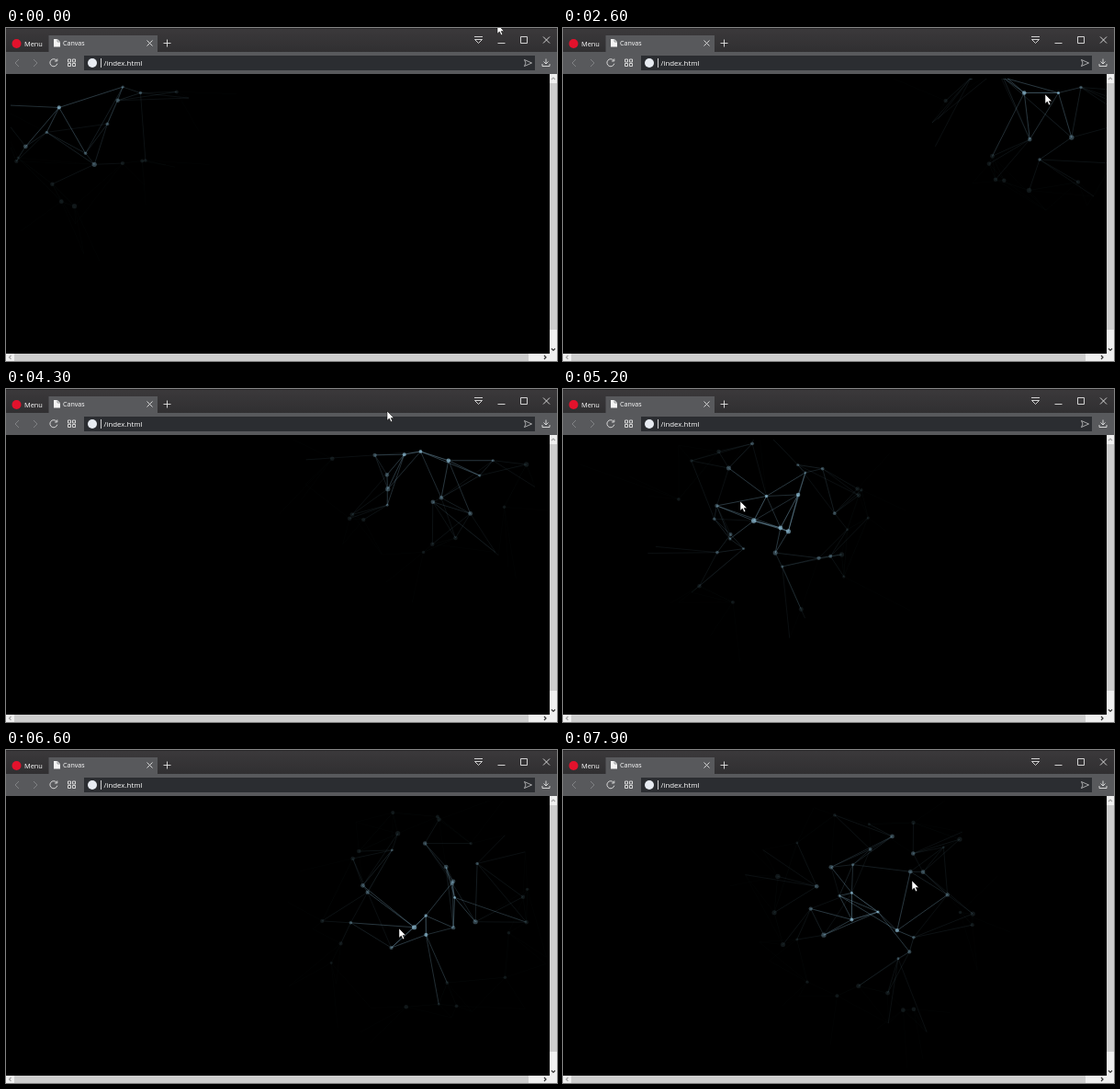
An HTML page with a canvas that plays this animation: 600x362 px, repeating every 8000 ms.

```html
<!DOCTYPE html>
<html lang="en">
<head>
<meta charset="utf-8">
<title>Canvas</title>
<style>
  html, body { margin: 0; width: 100%; height: 100%; overflow: hidden; background: #000; }
  svg, canvas { position: absolute; left: 0; top: 0; display: block; }
  canvas { left: 5px; top: 55px; }
  text { font: 7.4px "Open Sans", "Noto Sans", sans-serif; fill: #fff; }
  .line { fill: none; stroke: #e4e4e4; stroke-width: .9; }
  .dim { stroke: #85878a; }
  .arrow { stroke-width: 1.2; }
</style>
</head>
<body>
<canvas id="net" width="587" height="299"></canvas>
<svg width="600" height="362" viewBox="0 0 600 362">
  <defs>
    <linearGradient id="bar" x2="0" y2="1">
      <stop offset="0" stop-color="#3b393b"/><stop offset="1" stop-color="#302f31"/>
    </linearGradient>
  </defs>
  <!-- title bar, tab, toolbar -->
  <rect width="600" height="27" fill="url(#bar)"/>
  <rect width="600" height="1" fill="#29282a"/>
  <rect y="26" width="600" height="24" fill="#58595c"/>
  <rect x="46.500" y="8" width="118.500" height="19" fill="#58595c"/>
  <rect x="85" y="30" width="491" height="16" fill="#2b2d31"/>
  <circle cx="11.5" cy="17" r="5" fill="#e3122c"/>
  <circle cx="94" cy="38" r="5" fill="#e8ecf2"/>
  <text x="20" y="20">Menu</text>
  <text x="62" y="19.2" style="font-size:7.1px">Canvas</text>
  <text x="106.5" y="41" style="font-size:7.9px">/index.html</text>
  <path d="M52 12h4l3 3v5.500h-7z" fill="#f4f4f4"/>
  <path d="M56 12v3h3" fill="none" stroke="#77797c" stroke-width=".7"/>
  <path class="line" d="M153.500 13.500l6 6m0-6l-6 6M171.500 16.500h8m-4-4v8M103.500 33v10
    M510 9.500h9M510.500 12.500h8l-4 4zM535.500 16.500h8M560.500 9.500h7v7h-7z
    M585 9.500l7 7m0-7l-7 7M67.500 34h3v3h-3zm5 0h3v3h-3zm-5 4.500h3v3h-3zm5 0h3v3h-3z
    M55 35.200a4 4 0 1 0 .8 3.500M55.800 33.500v2.500h-2.700
    M588 33.500v5.500m-2.500-2.500l2.500 2.500 2.500-2.500M584 39v2.500h8v-2.500"/>
  <path class="line" stroke-opacity=".75" d="M564.500 34.500l8 3.500-8 3.500 1.500-3.500z"/>
  <path class="line dim" d="M14 34l-4 4 4 4M30 34l4 4-4 4"/>
  <!-- scroll bars -->
  <path d="M592 50h8v312H0v-8h592z" fill="#f0f0f0"/>
  <path d="M592 60h8v268h-8zM9 354h560v8H9z" fill="#cdcdcd"/>
  <path class="line arrow" style="stroke:#a6a6a6" d="M594 56l2-2 2 2M5.500 356l-2 2 2 2"/>
  <path class="line arrow" style="stroke:#333" d="M594 348.500l2 2 2-2M586 356l2 2-2 2"/>
  <path id="cursor" d="M0 0v10.200l2.400-2.200 1.700 3.800 1.700-.8-1.600-3.600h3.200z"
    fill="#fff" stroke="#000" stroke-width=".5"/>
</svg>
<script>
const LOOP = 8000, STEP = 100;
const CELL_W = 40, CELL_H = 30, WANDER = 29, LINKS = 5;
const PAGE_ENTRY = 2000, GLOW_LAG = 100, GLOW_TOP = 68;
const FIRST_GLOW = [74, 78];

// Key points of the pointer: time, x, y
const pointer = [
  [0, 535, -4], [1900, 537, -3], [2000, 520, 84], [2600, 525, 72],
  [3800, 500, 30], [4200, 460, 68], [4300, 415, 24], [4700, 430, 100],
  [5100, 228, 132], [5200, 193, 122], [5400, 145, 90], [5700, 430, 6],
  [6500, 455, 172], [6600, 428, 194], [7000, 120, 225], [7500, 150, 235],
  [7800, 345, 173], [7900, 380, 142]];

// Reach of the glow, line opacity, dot opacity
const levels = [[37, .3, .6], [83, .1, .3], [118, .02, .1]];
const tint = a => `rgba(158,212,238,${a})`;

let seed = 11;
function random() {
  seed = (seed * 16807) % 2147483647;
  return seed / 2147483647;
}
const around = (v, r) => v + (random() * 2 - 1) * r;
const linear = u => u;
const circInOut = u => u < .5
  ? (1 - Math.sqrt(1 - 4 * u * u)) / 2
  : (1 + Math.sqrt(1 - 4 * (1 - u) ** 2)) / 2;

function place(stops, t, ease) {
  const i = stops.findIndex(s => s[0] > t);
  if (i < 1) return stops.at(i).slice(1);
  const [t0, x0, y0] = stops[i - 1], [t1, x1, y1] = stops[i];
  const u = ease((t - t0) / (t1 - t0));
  return [x0 + (x1 - x0) * u, y0 + (y1 - y0) * u];
}

// A point drifts between random stops around its home.
function makePoint(x, y) {
  const stops = [];
  for (let t = -2000 * random(); t < LOOP + 2000; t += 1000 + 1000 * random()) {
    stops.push([t, around(x, WANDER), around(y, WANDER)]);
  }
  return { x, y, stops, radius: 1.4 + 1.3 * random() };
}

const points = [];
for (let x = 5; x < 640; x += CELL_W) {
  for (let y = 55; y < 400; y += CELL_H) {
    points.push(makePoint(x + CELL_W * random(), y + CELL_H * random()));
  }
}
const distance = (a, b) => Math.hypot(a.x - b.x, a.y - b.y);
for (const p of points) {
  p.near = points.filter(q => q !== p)
    .sort((a, b) => distance(a, p) - distance(b, p)).slice(0, LINKS);
}

// The glow trails the pointer and stays inside the page.
function glowAt(t) {
  if (t < PAGE_ENTRY + GLOW_LAG) return FIRST_GLOW;
  const [x, y] = place(pointer, t - GLOW_LAG, linear);
  return [x, Math.max(y, GLOW_TOP)];
}

const ctx = document.getElementById('net').getContext('2d');
const cursor = document.getElementById('cursor');
ctx.translate(-5, -55);
ctx.lineWidth = .7;

function draw(t) {
  ctx.clearRect(0, 0, 600, 362);
  const [gx, gy] = glowAt(t);
  for (const p of points) p.pos = place(p.stops, t, circInOut);
  for (const p of points) {
    const [x, y] = p.pos;
    const level = levels.find(([reach]) => Math.hypot(x - gx, y - gy) < reach);
    if (!level) continue;
    ctx.strokeStyle = tint(level[1]);
    for (const q of p.near) {
      ctx.beginPath();
      ctx.moveTo(x, y);
      ctx.lineTo(...q.pos);
      ctx.stroke();
    }
    ctx.fillStyle = tint(level[2]);
    ctx.beginPath();
    ctx.arc(x, y, p.radius, 0, 2 * Math.PI);
    ctx.fill();
  }
  cursor.setAttribute('transform', `translate(${place(pointer, t, linear)})`);
}

const start = performance.now();
function tick() {
  const t = Math.floor((performance.now() - start) % LOOP / STEP) * STEP;
  draw(t < 300 ? 0 : t);
  requestAnimationFrame(tick);
}
tick();
</script>
</body>
</html>
```
